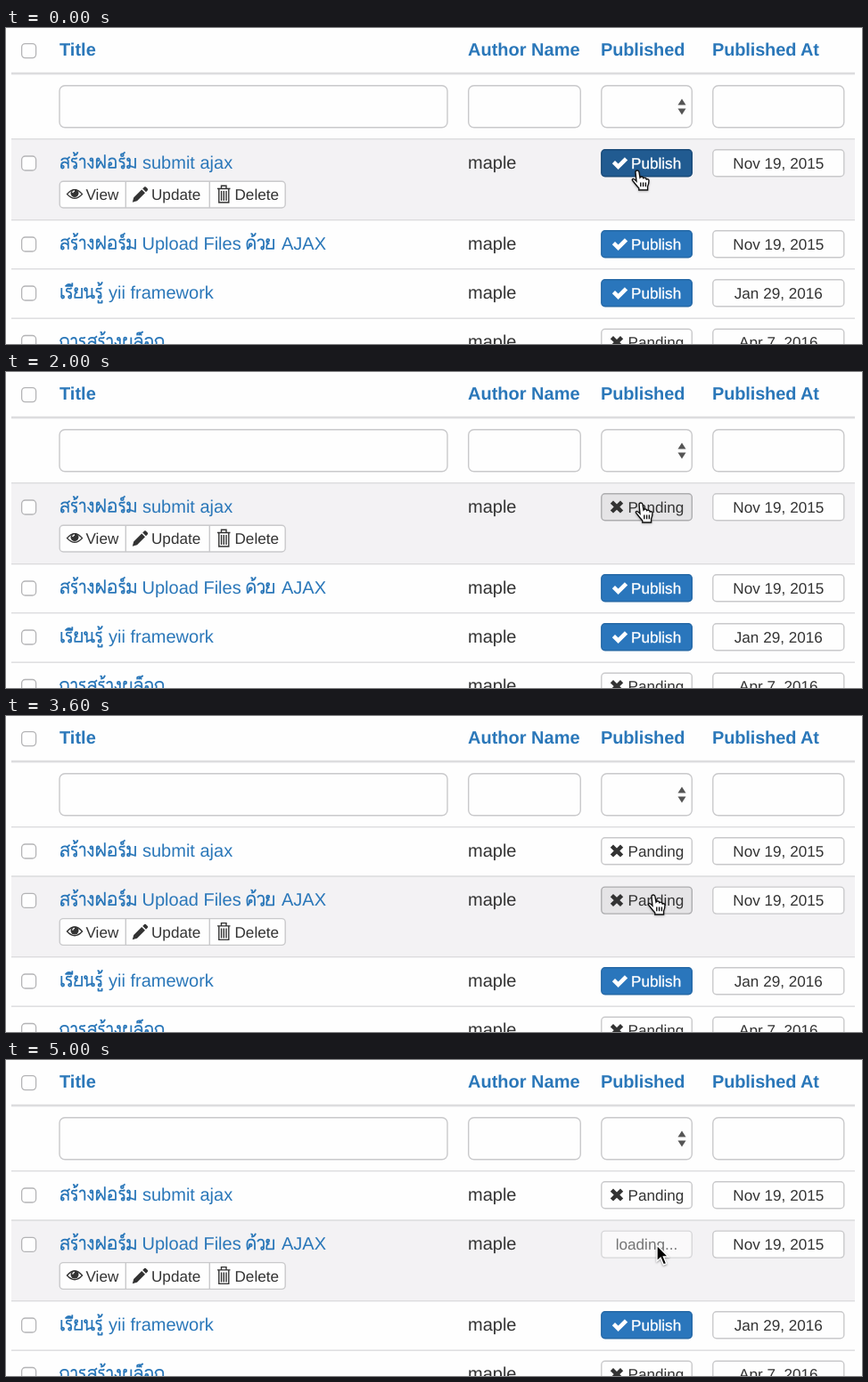
An HTML page that plays this animation: 960x355 px, repeating every 5.1 s.

```html
<!DOCTYPE html>
<html lang="en">
<head>
<meta charset="utf-8">
<title>Post list</title>
<style>
html, body { margin: 0; width: 100%; height: 100%; overflow: hidden; background: #fefefe; }
svg { display: block; }
text { font: 20px "Liberation Sans", Arial, sans-serif; fill: #333; text-rendering: geometricPrecision; }
.head { font-weight: bold; }
.head, .link { fill: #2a77b9; }
.small { font-size: 17.14px; }
.mid { text-anchor: middle; }
.thai { fill: none; stroke: #2a77b9; stroke-width: 1.8; stroke-linejoin: round; }
.box { fill: #fefefe; stroke: #c9c9cb; stroke-width: 1.4; }
.check { fill: #fefefe; stroke: #b4b4b6; stroke-width: 1.3; }
.rule { fill: #dcdcde; }
.back { fill: none; }
.over .back { fill: #f3f2f4; }
.icon { fill: #333; }
.line { fill: none; stroke: #333; stroke-width: 1.4; }
.status > g { display: none; }
.publish > .publish, .pending > .pending, .loading > .loading { display: inline; }
.publish .face { fill: #2a76bc; stroke: #2568a6; }
.publish text, .publish .icon { fill: #fff; }
.publish text { stroke: #fff; stroke-width: .3; }
.publish.hot .face { fill: #215b91; stroke: #194a78; }
.pending.hot .face { fill: #e5e4e6; stroke: #adadaf; }
.status.loading { opacity: .65; }
</style>
</head>
<body>
<svg id="stage" width="960" height="355" viewBox="0 0 960 355"></svg>
<script>
const LOOP = 5100, STEP = 100;
const stage = document.getElementById('stage');

function add(parent, tag, attrs = {}, label) {
  const el = document.createElementNS('http://www.w3.org/2000/svg', tag);
  for (const key in attrs) el.setAttribute(key, attrs[key]);
  if (label) el.textContent = label;
  return parent.appendChild(el);
}
const group = (parent, name = '') => add(parent, 'g', { class: name });
const path = (parent, d, name) => add(parent, 'path', { d, class: name });
const rect = (parent, x, y, width, height, name, rx = 0) =>
  add(parent, 'rect', { x, y, width, height, rx, class: name });
const write = (parent, x, y, label, name) => add(parent, 'text', { x, y, class: name }, label);
const place = (el, x, y) => el.setAttribute('transform', `translate(${x} ${y})`);

// Thai letters as pen strokes: advance, path, then centres of small loops.
const LA = 'M2-9Q3-11.5 6-11.5Q9.8-11.5 9.8-7.5V0M9.8-5Q7-7.6 4.5-7Q2-6.4 2-3V-1.6';
const GLYPHS = {
  'ส': [12, LA + 'M8.3-10.4L11.6-13', 3.4, -1.7],
  'ล': [12, LA, 3.4, -1.7],
  'ร': [9.5, 'M7.6-12.2Q7-10.6 4.5-11Q2-11.5 1.8-9Q1.8-7.6 4.5-7.4Q7-7 7-4.5V-1.7', 5.6, -1.6],
  'า': [9, 'M1-9Q1.8-11.5 4-11.5Q6.8-11.5 6.8-8V0'],
  'ง': [9.5, 'M6.8-10V-2Q6.8 0 5.3-.8L1-6', 5.3, -10],
  'ฟ': [13.5, 'M1.8-10V-1H2.6L6.2-8L9.8-1H10.8V-15.5', 3.3, -10],
  'อ': [12, 'M1.8-9Q2.5-11.5 5.5-11.5Q9.5-11.5 9.5-7.5V-1H1.9V-5', 3.4, -5.2],
  'ม': [12.5, 'M3.8-10V-3L10-.8V-11.8', 2.4, -10, 2.4, -1.8],
  'ด': [12, 'M2.2 0Q1.4-4 1.4-6.5Q1.6-11.5 5.8-11.5Q10-11.5 10-7V0M2.2-.2L4.6-4', 5.3, -5.2],
  'ว': [9.5, 'M1.2-9Q2-11.5 4.6-11.5Q8-11.5 8-7.5V-1.7', 6.6, -1.7],
  'ย': [11.5, 'M1.9-10Q1.6-7.5 4.2-6.8Q1.8-6 1.8-3.5V-.9H9.6V-11.8', 3.3, -10.2],
  'เ': [6, 'M2.3-11.8V-1.7', 3.7, -1.7],
  'น': [12.5, 'M3.7-10V-.6Q6-3 9.4-2.5M9.4-11.8V-1.8', 2.4, -10.2, 10.6, -1.8],
  'ก': [12, 'M2.2 0V-6.5L1-8Q2-11.5 5.5-11.5Q9.7-11.5 9.7-7.5V0'],
  'บ': [12, 'M1.8-10V-.9H9.8V-11.8', 3.2, -10.2],
  '้': [0, 'M-6.5-17.5Q-3.8-18-5-14.6Q-2-15-1-18.5'],
  '์': [0, 'M-4-16.2L-1.5-18.5', -4.7, -15],
  'ี': [0, 'M-8.5-14Q-5-17.5-1.2-14ZM-1.2-14V-17.6'],
  'ู': [0, 'M-5.5 2V4.8H-1.4V2'],
  '็': [0, 'M-7-14Q-8.5-17-5-17H-2L-1-18.5M-6-14.2Q-3.5-16.5-2.5-14']
};
function thai(parent, x, y, word) {
  const g = add(parent, 'g', { class: 'thai', role: 'img', 'aria-label': word });
  place(g, x, y);
  let pen = 0;
  for (const letter of word) {
    const [advance, d, ...loops] = GLYPHS[letter];
    pen += advance;
    const glyph = group(g);
    place(glyph, advance ? pen - advance : pen, 0);
    path(glyph, d);
    for (let i = 0; i < loops.length; i += 2)
      add(glyph, 'circle', { cx: loops[i], cy: loops[i + 1], r: 1.4 });
  }
}

const checkbox = (parent, y) => rect(parent, 17.6, y, 16, 16, 'check', 4);

function drawHead() {
  checkbox(stage, 17.6);
  write(stage, 60, 31, 'Title', 'head');
  write(stage, 518, 31, 'Author Name', 'head');
  write(stage, 667, 31, 'Published', 'head').setAttribute('letter-spacing', -.15);
  write(stage, 792, 31, 'Published At', 'head').setAttribute('letter-spacing', -.15);
  rect(stage, 6, 49.8, 946, 2.6, 'rule');
  for (const [x, w] of [[60, 435], [518.7, 125.6], [667.8, 101.5], [792.8, 147]])
    rect(stage, x, 64.7, w, 47, 'box', 6);
  path(stage, 'M753.5 86.5L758 79.5L762.5 86.5ZM753.5 90.5L758 97.5L762.5 90.5Z', 'icon')
    .style.fill = '#555';
}

function drawStatus(row) {
  const g = group(row, 'status');
  rect(g, 667.8, 12.7, 101.5, 30, 'box face', 4);
  const yes = group(g, 'publish'), no = group(g, 'pending'), wait = group(g, 'loading');
  path(yes, 'M679.8 28.2L683 25L686.6 28.5L693.9 21.2L697.2 24.5L686.6 35Z', 'icon');
  write(yes, 701, 33.8, 'Publish', 'small');
  path(no, 'M681 20.6L685 24.4L689 20.6L692.2 23.8L688.3 27.6L692.2 31.4L689 34.6' +
    'L685 30.8L681 34.6L677.8 31.4L681.7 27.6L677.8 23.8Z', 'icon');
  write(no, 697.5, 33.8, 'Panding', 'small');
  write(wait, 718.5, 33.8, 'loading...', 'small mid');
  return g;
}

function drawTools(row) {
  const g = group(row);
  rect(g, 60.2, 48.2, 253, 29.8, 'box', 4);
  path(g, 'M134.3 48.2V78M228.3 48.2V78', 'box');
  path(g, 'M68.5 62.6Q77 52.6 85.5 62.6Q77 72 68.5 62.6Z', 'line');
  add(g, 'circle', { cx: 77, cy: 61.6, r: 4.5, class: 'icon' });
  path(g, 'M74.7 61.2Q75 59.2 77 59', 'line').style.stroke = '#fff';
  path(g, 'M141.8 71.8L143.2 66.5L152.2 57.5L156 61.3L147 70.3ZM153.2 56.5L155.2 54.5' +
    'Q156 54 156.8 54.6L159 56.8Q159.4 57.5 158.9 58.3L157 60.3Z', 'icon');
  path(g, 'M237 56.5H251.5M241.5 56V53.2H247V56M238.8 57V72H249.8V57' +
    'M241.6 59V70M244.3 59V70M247 59V70', 'line');
  write(g, 89.5, 69.2, 'View', 'small');
  write(g, 163, 69.2, 'Update', 'small');
  write(g, 256.5, 69.2, 'Delete', 'small');
  return g;
}

function drawRow({ words, date }) {
  const g = group(stage);
  const back = rect(g, 6, 0, 946, 91, 'back');
  rect(g, 6, 0, 946, 1.4, 'rule');
  checkbox(g, 20);
  for (const [x, word] of words)
    word in GLYPHS || word[0] in GLYPHS ? thai(g, x, 33.8, word) : write(g, x, 33.8, word, 'link');
  write(g, 518, 33.8, 'maple');
  rect(g, 792.8, 12.7, 147, 30, 'box', 4);
  write(g, 866.3, 33.8, date, 'small mid');
  return { g, back, status: drawStatus(g), tools: drawTools(g) };
}

drawHead();
const rows = [
  { words: [[60, 'สร้างฟอร์ม'], [153, 'submit ajax']], date: 'Nov 19, 2015' },
  { words: [[60, 'สร้างฟอร์ม'], [152.5, 'Upload Files'], [269, 'ด้วย'], [309, 'AJAX']], date: 'Nov 19, 2015' },
  { words: [[60, 'เรียนรู้'], [115, 'yii framework']], date: 'Jan 29, 2016' },
  { words: [[60, 'การสร้างบล็อก']], date: 'Apr 7, 2016' }
].map(drawRow);

const arrow = path(stage, 'M0 0V18L4.1 14.2L7.4 22L10.7 20.6L7.4 13H12.8Z');
arrow.setAttribute('style', 'fill:#000;stroke:#fff;stroke-width:1.4;filter:drop-shadow(0 1px 1px #0006)');
const hand = group(stage);
hand.setAttribute('style', 'fill:#fff;stroke:#111;stroke-width:1.4;filter:drop-shadow(0 1px 1px #0004)');
path(hand, 'M-2 2Q-2 0 0 0Q1.8 0 2 2L3 8Q4 6.6 5.6 7.2Q6.5 7.6 6.7 8.6Q8 7.6 9.4 8.6' +
  'Q10 9.2 10.2 10Q12.6 9 13 11.4Q13 15 11.6 18V22H1.8V20Q-1 17-4 13Q-6.4 10.6-5.4 9.8Q-4 8.8-1 12Z');
path(hand, 'M3.8 13.5V18.2M6.6 13.5V18.2M9.4 13.5V18.2');

// Pointer track: time, x, y
const track = [
  [0, 708, 160], [600, 708, 160], [1100, 711, 158], [1400, 714, 153], [2000, 712, 147],
  [2200, 713, 152], [2300, 714, 176], [2400, 717, 208], [2500, 720, 231], [2600, 721, 234],
  [2700, 723, 224], [2800, 725, 210], [3600, 726, 201], [4400, 733, 203], [4700, 730, 208],
  [LOOP, 730, 208]
];
function pointer(t) {
  const i = track.findIndex(p => p[0] > t);
  const a = track[i - 1], b = track[i], k = (t - a[0]) / (b[0] - a[0]);
  return [a[1] + (b[1] - a[1]) * k, a[2] + (b[2] - a[2]) * k];
}

// Status changes per row: start time, status
const changes = [
  [[0, 'publish'], [600, 'loading'], [1100, 'pending']],
  [[0, 'publish'], [3000, 'loading'], [3400, 'pending'], [4700, 'loading']],
  [[0, 'publish']],
  [[0, 'pending']]
];

function render(t) {
  const active = t < 2500 ? 0 : 1;
  const tops = [124, active ? 179.4 : 215, 270, 325.5];
  const [x, y] = pointer(t);
  let pointing = false;
  rows.forEach((row, i) => {
    const top = tops[i];
    const status = changes[i].filter(c => c[0] <= t).pop()[1];
    const inside = x > 667 && x < 770 && y > top + 12 && y < top + 43;
    const hot = inside && status !== 'loading';
    pointing = pointing || hot;
    place(row.g, 0, top);
    row.g.setAttribute('class', i === active ? 'over' : '');
    row.tools.style.display = i === active ? '' : 'none';
    row.status.setAttribute('class', `status ${status}${hot ? ' hot' : ''}`);
  });
  place(arrow, x, y);
  place(hand, x, y);
  arrow.style.display = pointing ? 'none' : '';
  hand.style.display = pointing ? '' : 'none';
}

const start = performance.now();
function tick() {
  const t = (performance.now() - start) % LOOP;
  render(Math.floor(t / STEP) * STEP);
  requestAnimationFrame(tick);
}
tick();
</script>
</body>
</html>
```
